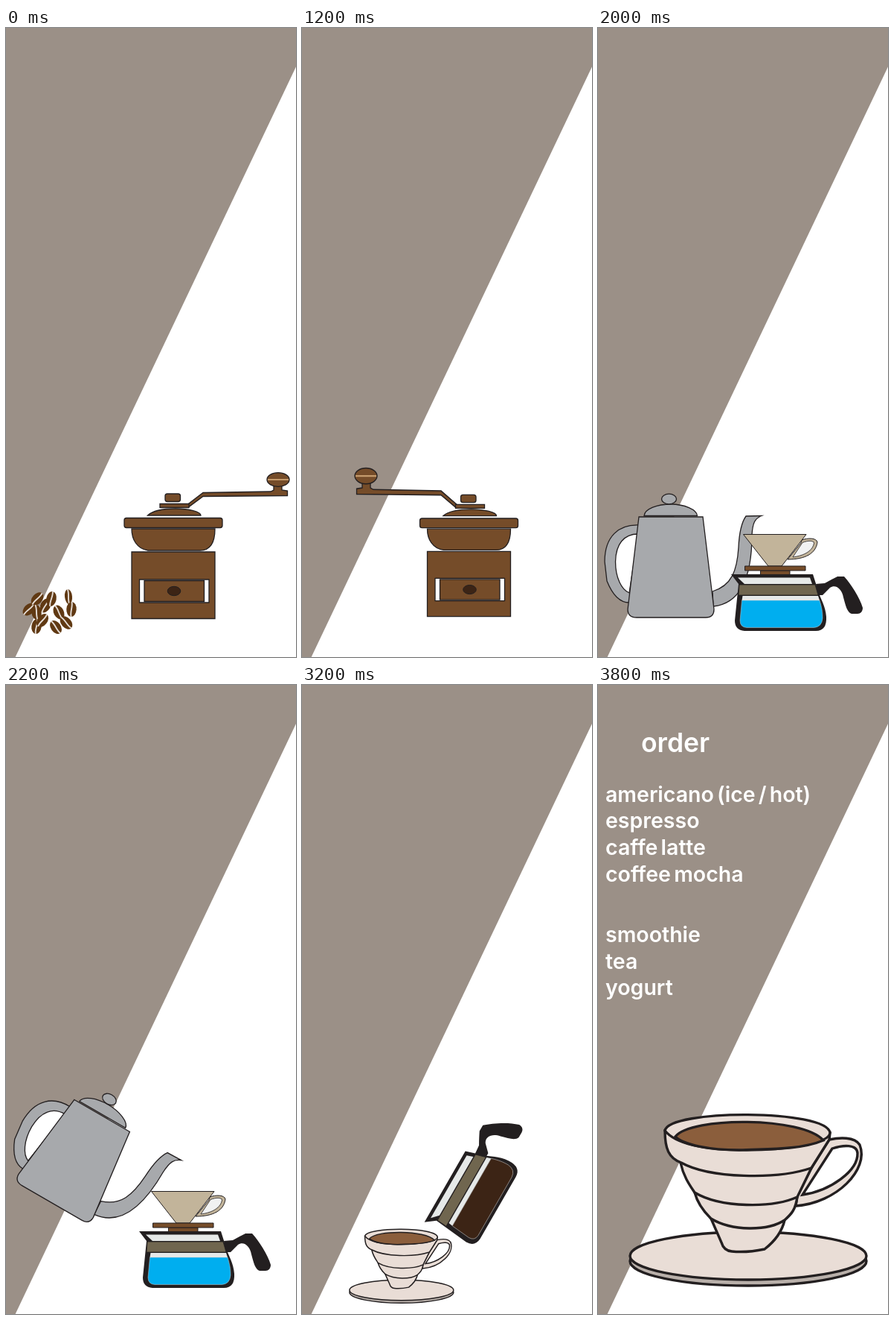
Recreate the animation shown at these times as an HTML page with a canvas. Size 390 by 844 pixels, loop 4400 ms.

```html
<!DOCTYPE html>
<html lang="en">
<head>
<meta charset="utf-8">
<title>Coffee order</title>
<style>
html, body { margin: 0; width: 100%; height: 100%; overflow: hidden; background: #fff; }
canvas, svg { position: absolute; left: 0; top: 0; width: 390px; height: 844px; display: block; }
text { font: 600 28.5px Inter, "Open Sans", sans-serif; word-spacing: -3px; fill: #fff; }
.head { font-size: 35.5px; }
</style>
</head>
<body>
<canvas id="stage"></canvas>
<svg id="menu" viewBox="0 0 390 844" visibility="hidden">
  <text class="head" x="58" y="90">order</text>
  <text x="10" y="157">americano (ice / hot)</text>
  <text x="10" y="192">espresso</text>
  <text x="10" y="228">caffe latte</text>
  <text x="10" y="264">coffee mocha</text>
  <text x="10" y="345">smoothie</text>
  <text x="10" y="381">tea</text>
  <text x="10" y="416">yogurt</text>
</svg>
<script>
const W = 390, H = 844, STEP = 200, STEPS = 22;
const INK = '#231f20', WOOD = '#754c29', STEEL = '#a7a9ac', GLASS = '#e6e9e8';
const DARK = '#3c2415', CHINA = '#e9ddd6', WATER = '#00aeef', CLAY = '#c2b49a';
const canvas = document.getElementById('stage');
const menu = document.getElementById('menu');
const ratio = window.devicePixelRatio || 1;
canvas.width = W * ratio;
canvas.height = H * ratio;
const ctx = canvas.getContext('2d');

function paint(path, fill, width = 1.3, stroke = INK) {
  if (fill) { ctx.fillStyle = fill; ctx.fill(path, 'evenodd'); }
  if (width) { ctx.lineWidth = width; ctx.strokeStyle = stroke; ctx.stroke(path); }
}
const shape = (d, fill, width, stroke) => paint(new Path2D(d), fill, width, stroke);

function box(x1, y1, x2, y2, r, fill, width) {
  const p = new Path2D();
  p.roundRect(x1, y1, x2 - x1, y2 - y1, r);
  paint(p, fill, width);
}
function oval(x, y, rx, ry, fill, width) {
  const p = new Path2D();
  p.ellipse(x, y, rx, ry, 0, 0, Math.PI * 2);
  paint(p, fill, width);
}
function within(move, draw) {
  ctx.save();
  move();
  draw();
  ctx.restore();
}
const shift = (x, y, draw) => within(() => ctx.translate(x, y), draw);

// moves point (x, y) to (tx, ty) and turns around it
function turn(x, y, tx, ty, deg, draw) {
  within(() => {
    ctx.translate(tx, ty);
    ctx.rotate(deg * Math.PI / 180);
    ctx.translate(-x, -y);
  }, draw);
}

function background() {
  ctx.fillStyle = '#fff';
  ctx.fillRect(0, 0, W, H);
  shape('M0 0H390V52L12.6 844H0Z', '#9b9087', 0);
}

// x, y, tilt in degrees
const BEANS = [
  [31, 780, 45], [42, 766, 42], [41, 803, 8], [41, 784, -8], [53, 775, 28],
  [61, 766, 12], [49, 795, 38], [71, 784, -28], [84, 763, -6], [88, 780, 4],
  [81, 798, -42], [67, 804, -36]
];
function beans() {
  for (const [x, y, tilt] of BEANS) {
    turn(0, 0, x, y, tilt, () => {
      oval(0, 0, x === 84 ? 5 : 6.7, 10, '#603913', 0);
      shape('M-.3 -10C2 -4 -2 4 .3 10', null, 1.9, '#e4dcd5');
    });
  }
}

function crank() {
  shape('M360 614H371V620L378.5 621V627.5L265 628.5L246 642.5H240L265 623.5L356 622L360 620Z', WOOD);
  oval(366, 606, 15, 9.3, WOOD);
  shape('M352 606H380', null, 2, '#c49a6c');
}
function mill() {
  box(207, 638.5, 246, 643.5, 0, WOOD);
  box(214, 625, 234.5, 635.5, 3, WOOD);
  shape('M190.5 654C197 648 210 645 228 645C246 645 262 649 262 654Z', WOOD);
  box(159, 657.5, 291, 670.5, 3, WOOD);
  shape('M169 672H281C281 690 275 701 261 701H191C176 699 169 686 169 672Z', WOOD);
  box(169, 703, 281, 792.5, 0, WOOD);
  box(179.5, 740, 273, 771, 0, '#fff');
  box(186, 741.5, 266.5, 769.5, 0, WOOD);
  oval(226, 755.5, 8.8, 6.2, DARK, 1);
}
function grinder(flipped) {
  if (!flipped) { crank(); mill(); return; }
  within(() => ctx.transform(-1, 0, 0, 1.14, 452, -0.14 * 641), crank);
  within(() => ctx.transform(1, 0, 0, 0.975, -0.5, 658 - 657.5 * 0.975), mill);
}

function kettle() {
  shape('M154 756C180 748 187 728 189 697C190 675 194 662 199 655L220 654.5C211 658 208 664 207 680C207 730 195 772 155 776Z', STEEL);
  shape('M55 667C28 666 9 682 9 716L12 742C20 762 30 771 42 771L55 667Z', STEEL);
  shape('M54 679C35 679 24 692 23.5 716C23.5 738 32 754 42 758L54 679Z', '#fff');
  shape('M55 656H141L156 780Q156 791 145 791H52Q40 791 40 780Z', STEEL);
  shape('M62 654.5C63 645 80 639 98 639C116 639 133 646 133.5 654.5Z', STEEL);
  oval(95.5, 632, 10, 6.8, STEEL);
}

function dripper() {
  shape('M274 687C282 684 294 684 295 690C293 705 279 713 255 713L273 691Z', CLAY, 1);
  shape('M275 690.5C282 687.5 290 687.5 290.5 691C289 701 278 708 262 710Z', '#f1f2f2', 0.8);
  shape('M195.5 679.5H280L247 722H229Z', CLAY, 1);
  box(218.5, 728, 258, 734, 0, WOOD, 1);
  box(197.5, 722, 279, 728, 0, WOOD, 1);
}

function pot(liquid) {
  shape('M293 746L305 745C312 741 318 738 322 736H331C340 746 352 764 356 778C356 783 353 786 349 786H341C335 784 333 775 330 764C328 753 320 746 312 751L302 761H295Z', INK, 0);
  shape('M179 733H289L296 755C299 766 306 775 307 790Q308 809 293 809H197Q184 808 184 795L189 746Z', INK, 0);
  shape('M188 737.5H285L288 746H197Z', GLASS, 0);
  shape('M190 747H292L296 761H189Z', '#70664f', 0.8);
  shape('M194.5 762H296L298 768H193.5Z', GLASS, 0);
  shape('M193.5 768H298C301 778 302 784 302 792Q301 804 290 804.5H200Q191 804 191 795Z', liquid, 0.5, '#cfcfcf');
}

function cup(full) {
  const w = 3.4;
  oval(202, 773, 159, 33, '#b9b0aa', w);
  oval(202, 766, 159, 32, CHINA, w);
  shape('M311 610C325 607 345 606 352 617C365 650 321 695 266 699L268 686L287 648ZM315 622L275 684C312 679 350 652 349 628C348 616 330 617 315 622Z', CHINA, w);
  shape('M152 716L166 748Q169 759 180 760Q200 762 224 757Q246 740 251 718Z', CHINA, w);
  shape('M130 681C135 700 148 712 152 716C180 733 228 733 251 718C260 710 266 704 268 686Z', CHINA, w);
  shape('M111 641C115 660 124 672 130 681C165 702 235 702 268 687L287 648Z', CHINA, w);
  shape('M90 598C90 622 95 635 112 641C150 662 240 664 287 648L311 610L312 601Z', CHINA, w);
  shape('M90 598C95 569 308 569 312 601C311 616 250 624 200 624C150 624 106 618 90 598Z', CHINA, w);
  if (full) shape('M104 606C125 579 275 579 303 611C270 625 220 622 190 624C150 624 115 617 104 606Z', '#8b5e3c', w);
}
function smallCup(x, y, full) {
  within(() => {
    ctx.translate(63 + x, 729.5 + y);
    ctx.scale(0.44, 0.432);
    ctx.translate(-41, -575);
  }, () => cup(full));
}

const BEAN_MOVES = [[0, 0], [24, -73], [67, -144], [160, -124]];

function scene(n) {
  if (n < 8) {
    if (n < 4) shift(...BEAN_MOVES[n], beans);
    grinder(n === 4 || n === 6);
  } else if (n < 14) {
    if (n === 10) kettle();
    if (n > 10 && n < 13) turn(114, 708, 117, 631, 30, kettle);
    shift(n === 8 ? 40 : 0, n === 8 ? -251 : 0, () => {
      if (n < 13) dripper();
      pot(n < 12 ? WATER : DARK);
    });
  } else if (n < 18) {
    smallCup(n < 16 ? -1 : 0, 0, n >= 16);
    if (n === 14) shift(-28.5, -125, () => pot(DARK));
    else if (n < 17) turn(180, 734, 166, 720.5, -60, () => pot(DARK));
  } else if (n === 18) {
    smallCup(42, -226, true);
  } else {
    cup(true);
  }
}

const start = performance.now();
let last = -1;
function tick() {
  const n = Math.floor((performance.now() - start) / STEP) % STEPS;
  if (n !== last) {
    last = n;
    ctx.setTransform(ratio, 0, 0, ratio, 0, 0);
    background();
    scene(n);
    menu.setAttribute('visibility', n >= 17 ? 'visible' : 'hidden');
  }
  requestAnimationFrame(tick);
}
tick();
</script>
</body>
</html>
```
